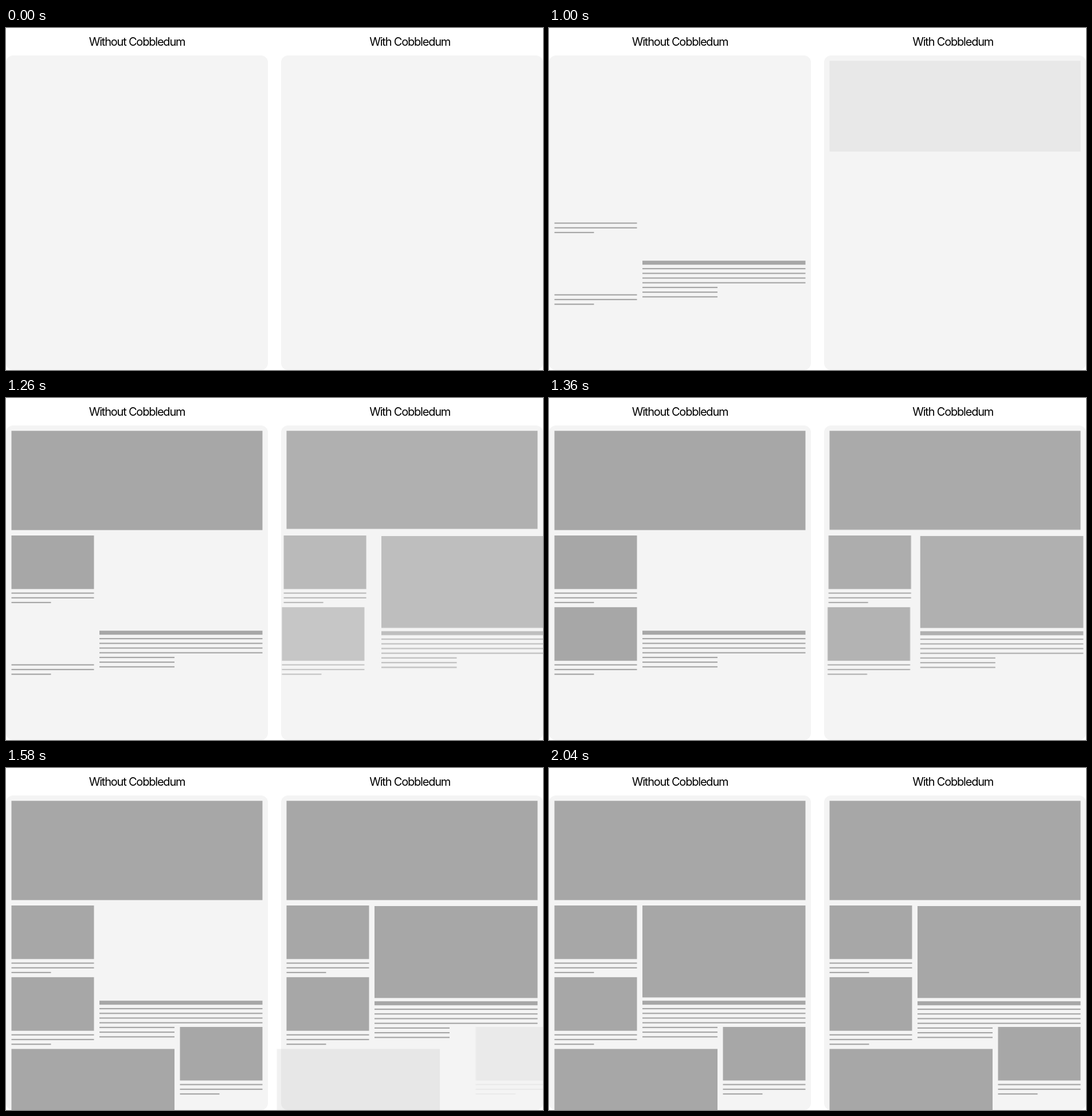
Write an HTML page that moves like this. It is 937x597 px and loops after 3040 ms.

```html
<!DOCTYPE html>
<html lang="en">
<head>
<meta charset="utf-8">
<title>Page loading comparison</title>
<style>
  html, body { margin: 0; width: 100%; height: 100%; overflow: hidden; background: #fff; }
  svg { display: block; width: 100%; height: 100%; }
  text {
    font: 400 20px Inter, sans-serif;
    font-optical-sizing: none;
    letter-spacing: -0.06em;
    text-anchor: middle;
  }
  .panel { fill: #f4f4f4; }
  .page { fill: #a7a7a7; }
  #heroAfter { transform-origin: 0 57.5px; }
</style>
</head>
<body>
<svg viewBox="0 0 937 597">
  <text x="228.5" y="30.5">Without Cobbledum</text>
  <text x="704.7" y="30.5">With Cobbledum</text>
  <rect class="panel" y="48" width="457" height="549" rx="12"/>
  <rect class="panel" x="480" y="48" width="457" height="549" rx="12"/>
  <g class="page" id="before"></g>
  <g class="page" id="after" transform="translate(480 0)"></g>
</svg>
<script>
const LOOP = 3040;
const before = document.getElementById('before');
const after = document.getElementById('after');

function add(parent, tag, attrs = {}) {
  const el = document.createElementNS('http://www.w3.org/2000/svg', tag);
  for (const [name, value] of Object.entries(attrs)) el.setAttribute(name, value);
  return parent.appendChild(el);
}
const group = (parent, id) => add(parent, 'g', id ? { id } : {});
const box = (g, x, y, width, height) => add(g, 'rect', { x, y, width, height });
const lines = (g, x, y, widths) => widths.forEach((w, i) => box(g, x, y + i * 8.2, w, 2.2));

// Page parts, each drawn into a given group.
const hero = g => box(g, 9.5, 57.3, 438, 173.3);
const thumb = (x, y) => g => box(g, x, y, 144, 93.5);
const caption = (x, y) => g => lines(g, x, y + 99.5, [144, 144, 69]);
const feature = g => box(g, 163, 240, 284.5, 160.5);
const wide = g => box(g, 9.5, 490.4, 284.5, 107);
function article(g) {
  box(g, 163, 406.2, 284.5, 7);
  lines(g, 163, 419, [284.5, 284.5, 284.5, 284.5, 131, 131, 131]);
}
const first = [9.5, 240], second = [9.5, 365.2], third = [303.5, 452];

function loop(el, frames) {
  el.animate(frames.map(({ at, ...rest }) => ({ offset: at / LOOP, ...rest })),
    { duration: LOOP, iterations: Infinity });
}

// Parts that pop in as soon as they arrive.
function pop(at, ...parts) {
  const g = group(before);
  parts.forEach(draw => draw(g));
  loop(g, [
    { at: 0, opacity: 0, easing: 'step-end' },
    { at, opacity: 1 },
    { at: LOOP, opacity: 1 }
  ]);
}

// Parts that fade in while sliding to their place.
function slide(start, dx, dy, parts, y = 0) {
  const g = group(add(after, 'g', { transform: `translate(0 ${y})` }));
  parts.forEach(draw => draw(g));
  const hidden = { opacity: 0, transform: `translate(${dx}px, ${dy}px)` };
  const shown = { opacity: 1, transform: 'translate(0px, 0px)' };
  loop(g, [
    { at: 0, ...hidden },
    { at: start, ...hidden, easing: 'ease' },
    { at: start + 533, ...shown },
    { at: LOOP, ...shown }
  ]);
}

pop(860, article);
pop(960, caption(...first), caption(...second));
pop(1020, hero);
pop(1260, thumb(...first));
pop(1300, thumb(...second));
pop(1440, wide);
pop(1500, thumb(...third), caption(...third));
pop(1660, feature);

const heroAfter = group(after, 'heroAfter');
hero(heroAfter);
loop(heroAfter, [
  { at: 0, opacity: 0, transform: 'scaleY(.9)', easing: 'step-end' },
  { at: 860, opacity: .012, transform: 'scaleY(.9)', easing: 'step-end' },
  { at: 930, opacity: .012, transform: 'scaleY(.9)', easing: 'ease' },
  { at: 1490, opacity: 1, transform: 'scaleY(1)' },
  { at: LOOP, opacity: 1, transform: 'scaleY(1)' }
]);

slide(1018, -20, 0, [thumb(...first), caption(...first)]);
slide(1077, -20, 0, [thumb(...second), caption(...second)]);
slide(1040, 42, -.8, [feature, article], 1);
slide(1508, -20, 0, [wide]);
slide(1516, 42, 0, [thumb(...third), caption(...third)]);
</script>
</body>
</html>
```
